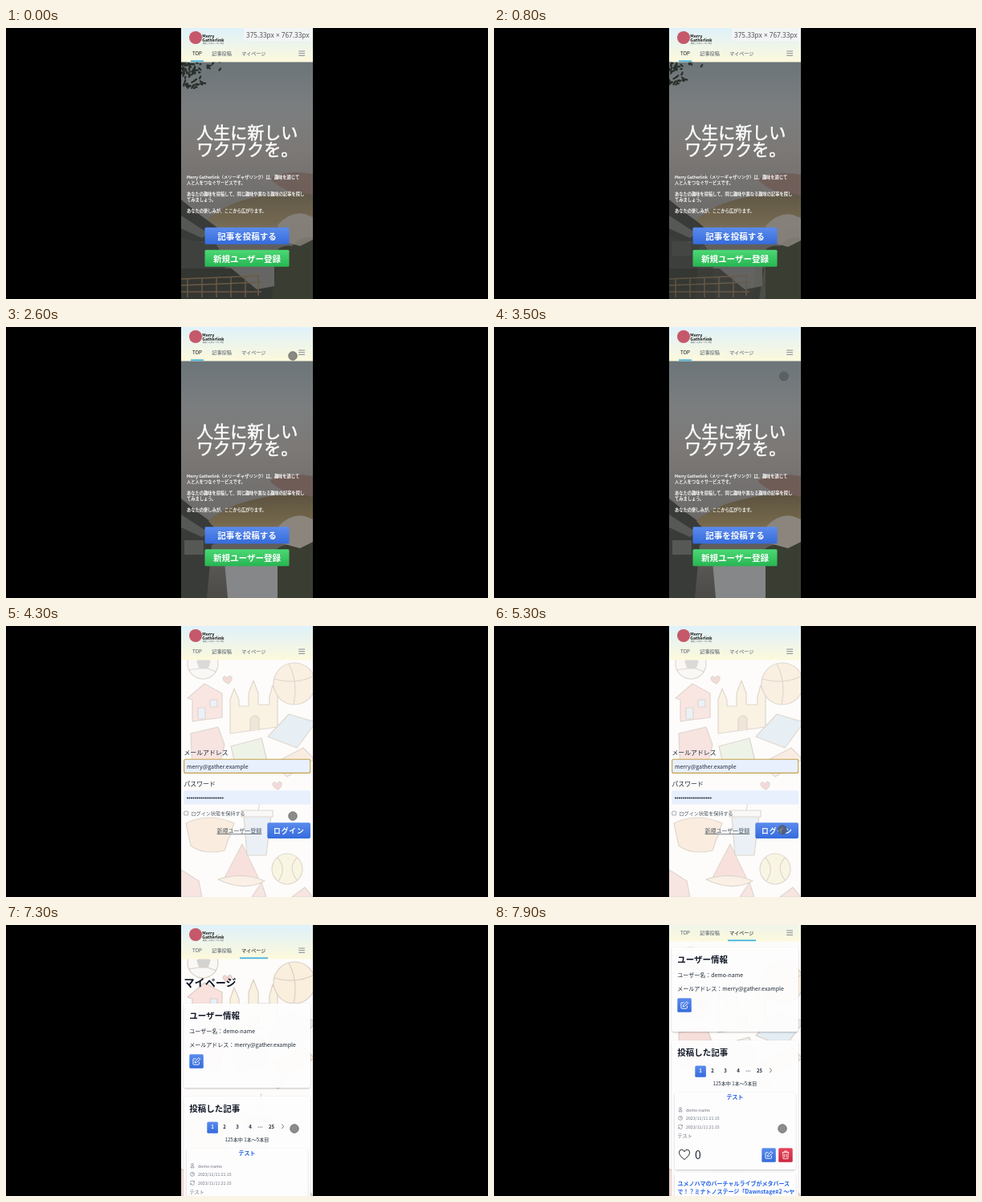
Write an HTML page that moves like this. It is 600 px wide and 338 px high and loops after 8 s.

```html
<!DOCTYPE html>
<html lang="ja">
<head>
<meta charset="utf-8">
<title>Merry Gatherlink</title>
<style>
  html, body { margin: 0; width: 100%; height: 100%; overflow: hidden; background: #000; }
  svg { display: block; width: 100vw; height: 100vh; }
  text { font-family: "Noto Sans CJK JP", "Noto Sans CJK", "Noto Sans", sans-serif; font-size: 7px; fill: #1f2937; }
  .b { font-weight: 700; }
  .mid { text-anchor: middle; }
  .small { font-size: 6.12px; }
  .h2 { font-size: 10.5px; font-weight: 700; fill: #111827; }
  .label { font-size: 7.86px; }
  .nav text { font-size: 6.12px; fill: #4b5563; }
  .nav .on { fill: #111; }
  .hero text { fill: #fff; }
  .hero .lead { font-size: 5.24px; stroke: #fff; stroke-width: .16; }
  .hero .big { font-size: 21px; stroke: #fff; stroke-width: .5; }
  .hero .btn { font-size: 10.5px; font-weight: 700; }
  .meta text { font-size: 5.24px; fill: #6b7280; }
  .link { fill: #2563eb; font-weight: 700; }
  .icon { fill: none; stroke: #6b7280; stroke-width: .6; }
  .card { fill: #fff; fill-opacity: .93; filter: url(#shadow); }
</style>
</head>
<body>
<svg viewBox="0 0 600 338" preserveAspectRatio="none">
  <defs>
    <linearGradient id="head" x2="0" y2="1"><stop stop-color="#dff1fa"/><stop offset="1" stop-color="#fdf9dc"/></linearGradient>
    <linearGradient id="blue" x2="0" y2="1"><stop stop-color="#5b8bec"/><stop offset="1" stop-color="#356bdc"/></linearGradient>
    <linearGradient id="green" x2="0" y2="1"><stop stop-color="#4cd874"/><stop offset="1" stop-color="#27b552"/></linearGradient>
    <linearGradient id="red" x2="0" y2="1"><stop stop-color="#e5455a"/><stop offset="1" stop-color="#cb2740"/></linearGradient>
    <linearGradient id="sky" x2="0" y2="1"><stop stop-color="#6c7579"/><stop offset=".2" stop-color="#7b7e7f"/><stop offset=".36" stop-color="#7c7977"/><stop offset=".65" stop-color="#6d6b69"/><stop offset="1" stop-color="#4c4a47"/></linearGradient>
    <linearGradient id="scales" x2="0" y2="1"><stop stop-color="#5c5340"/><stop offset=".55" stop-color="#73664a"/><stop offset="1" stop-color="#857b6c"/></linearGradient>
    <filter id="shadow" x="-10%" y="-10%" width="120%" height="125%"><feDropShadow dx="0" dy="1" stdDeviation="1" flood-opacity=".25"/></filter>
    <filter id="soft"><feGaussianBlur stdDeviation=".6"/></filter>
    <filter id="haze" x="-10%" y="-10%" width="120%" height="120%"><feGaussianBlur id="blur" stdDeviation="1"/></filter>
    <clipPath id="screen"><rect x="218" width="164" height="338"/></clipPath>
    <g id="pen" fill="none" stroke="#fff" stroke-width=".9" stroke-linejoin="round">
      <path d="M-.5 -3.4H-3.2Q-4 -3.4 -4 -2.6V3.2Q-4 4 -3.2 4H2.6Q3.4 4 3.4 3.2V.5M-1.7 1.7L-1.2 -.5 3 -4.7 4.7 -3 .5 1.2Z"/>
    </g>
    <g id="person" class="icon"><circle cy="-1.4" r="1.3"/><path d="M-2 2.6Q-2 .4 0 .4T2 2.6Z"/></g>
    <g id="clock" class="icon"><circle r="2.5"/><path d="M0 -1.5V0H1.5"/></g>
    <g id="cycle" class="icon"><path d="M-2.6 -.3A2.5 2.5 0 0 1 2.2 -1.2M2.6 .3A2.5 2.5 0 0 1 -2.2 1.2M2.4 -2.6V-1H.8M-2.4 2.6V1H-.8"/></g>
  </defs>

  <rect width="600" height="338"/>
  <g clip-path="url(#screen)">
    <g id="home" class="hero">
      <rect x="218" y="42" width="164" height="296" fill="url(#sky)"/>
      <g filter="url(#soft)">
        <g id="leaves" fill="#2a2f2a"></g>
        <!-- trees and building -->
        <path d="M326 290Q340 268 356 272 368 258 382 262V338H322Z" fill="#3a3d31"/>
        <path d="M218 214L240 232 262 248 276 262 256 272 250 338H218Z" fill="#393b39"/>
        <path d="M218 234L252 256 244 262 218 250ZM222 266H246V284H222Z" fill="#555855"/>
        <!-- fish and hand -->
        <g id="fish">
          <path d="M328 192Q348 180 382 186V214Q350 212 328 192Z" fill="#6f5c56"/>
          <path d="M252 242Q274 222 314 214 350 204 382 212V266Q344 272 308 268 268 264 252 242Z" fill="url(#scales)"/>
          <path d="M338 250Q354 232 372 236L382 240V268L366 276 344 270Z" fill="#8b857e"/>
        </g>
        <path id="cloth" d="M272 292L338 298V338H276Z" fill="#858788"/>
        <g id="deck">
          <path d="M218 262L262 270 276 296 268 304H218Z" fill="#3f413f"/>
          <path d="M218 300H336L330 338H218Z" fill="#343631"/>
          <path d="M276 296L334 290V322L312 326Z" fill="#656663"/>
          <path d="M218 313L316 309M218 321L318 317M218 329H318M226 312V336M244 312V336M262 311V336M280 310V336M298 310V336M314 309V334" fill="none" stroke="#6a5a45" stroke-width="1.5"/>
        </g>
      </g>
      <text class="big" x="237.3" y="138">人生に新しい</text>
      <text class="big" x="237.3" y="159">ワクワクを。</text>
      <g id="copy">
        <text class="lead" x="225" y="188">Merry Gatherlink（メリーギャザリンク）は、趣味を通じて</text>
        <text class="lead" x="225" y="195">人と人をつなぐサービスです。</text>
        <text class="lead" x="225" y="209">あなたの趣味を投稿して、同じ趣味や異なる趣味の記事を探し</text>
        <text class="lead" x="225" y="216">てみましょう。</text>
        <text class="lead" x="225" y="230">あなたの楽しみが、ここから広がります。</text>
        <rect x="247.5" y="249.3" width="105" height="21" rx="1.5" fill="url(#blue)"/>
        <text class="btn mid" x="300" y="264">記事を投稿する</text>
        <rect x="247.5" y="277.3" width="105" height="21" rx="1.5" fill="url(#green)"/>
        <text class="btn mid" x="300" y="292">新規ユーザー登録</text>
      </g>
    </g>

    <g id="paper">
      <rect x="218" width="164" height="338" fill="#fdfcfb"/>
      <g id="doodles" stroke="#8a6a4a" stroke-width="1.2" stroke-linejoin="round">
        <circle cx="245" cy="47" r="19" fill="#f0efee"/>
        <path d="M238 44L246 38 254 44 251 53H241ZM227 55L241 53M251 53L262 57" fill="#777"/>
        <circle cx="359" cy="72" r="26" fill="#f5cf9a"/>
        <path d="M334 66Q360 74 384 62M352 47Q364 70 358 98" fill="none"/>
        <path d="M226 90L247 72 269 84V114L232 119V92Z" fill="#f0a69c"/>
        <path d="M239 102H248V116H239ZM254 92H263V101H254Z" fill="#b8d3ec"/>
        <path d="M279 134V92L284 78 290 92V100H302V84L308 68 314 84V98H328V88L332 74 338 88V126Z" fill="#f3dca4"/>
        <path d="M304 131V116Q309 108 315 115V130" fill="#c9a678"/>
        <path d="M230 134L264 126 272 148 264 180H232Z" fill="#e99a92"/>
        <path d="M326 138L352 110 386 120 362 152Z" fill="#a9cbe3"/>
        <path d="M332 172L370 152 384 166 350 188Z" fill="#efc2a0"/>
        <path d="M280 150L318 140 326 172 288 184Z" fill="#c5d9b4"/>
        <path d="M224 246Q252 232 284 246L272 280Q246 286 230 274Z" fill="#f2c48e"/>
        <path d="M296 238L330 236 324 286H300Z" fill="#b5d0e6"/>
        <path d="M293 230H332V238H293ZM314 230L318 210" fill="#f0efee"/>
        <path d="M272 314L294 272 314 314Q294 324 272 314Z" fill="#ea9388"/>
        <path d="M264 316Q294 306 322 318 296 332 264 316Z" fill="#f3cda5"/>
        <circle cx="350" cy="303" r="19" fill="#f1e2a0"/>
        <path d="M338 289Q350 302 339 318M362 289Q350 302 363 318" fill="none"/>
        <path d="M218 304L240 318 244 338H218ZM306 338L318 320 324 338ZM356 338L372 326 382 338Z" fill="#e8a39a"/>
        <path d="M276 66q-4 -6 -6 -1 0 4 7 7 5 -5 4 -8 -4 -4 -5 2ZM338 198q-4 -6 -6 -1 0 4 7 7 5 -5 4 -8 -4 -4 -5 2Z" fill="#e07a7a"/>
      </g>
    </g>

    <g id="login">
      <text class="label" x="221.5" y="161">メールアドレス</text>
      <rect x="221.7" y="166.2" width="157" height="17.2" rx="2" fill="#e8f0fe" stroke="#c4a24a" stroke-width="1.1"/>
      <text x="225" y="177.5">merry@gather.example</text>
      <text class="label" x="221.5" y="200">パスワード</text>
      <rect x="221.2" y="205.2" width="158" height="17.4" rx="2" fill="#e8f0fe"/>
      <path d="M226 214.5H270" stroke="#1f2937" stroke-width="1.9" stroke-linecap="round" stroke-dasharray="0 2.43"/>
      <rect x="221.8" y="231.2" width="4.8" height="4.8" rx="1" fill="#fff" stroke="#6b7280" stroke-width=".6"/>
      <text class="small" x="230.5" y="236" style="fill:#4b5563">ログイン状態を保持する</text>
      <text x="262.5" y="258" style="fill:#4b5563" text-decoration="underline">新規ユーザー登録</text>
      <rect x="325.3" y="245.3" width="53.7" height="19.8" rx="2" fill="url(#blue)"/>
      <text class="b" x="333" y="258.6" style="font-size:8.74px;letter-spacing:.9px;fill:#fff">ログイン</text>
    </g>

    <g id="mypage">
      <text class="b" x="221.5" y="77" style="font-size:13.1px;fill:#111827">マイページ</text>
      <rect class="card" x="221.3" y="98" width="157.5" height="105" rx="3"/>
      <text class="h2" x="228.3" y="116.5">ユーザー情報</text>
      <text x="228.3" y="134.5">ユーザー名：demo-name</text>
      <text x="228.3" y="152">メールアドレス：merry@gather.example</text>
      <rect x="228.3" y="161.3" width="17.5" height="17.5" rx="1.5" fill="url(#blue)"/>
      <use href="#pen" x="237" y="170.2"/>
      <rect class="card" x="221.3" y="214" width="157.5" height="300" rx="3"/>
      <text class="h2" x="228.3" y="232.5">投稿した記事</text>
      <rect x="250.3" y="245.5" width="13.6" height="14.3" rx="1.5" fill="url(#blue)"/>
      <g class="b mid">
        <text class="small" x="257" y="254" style="fill:#fff">1</text>
        <text class="small" x="272" y="254">2</text>
        <text class="small" x="288" y="254">3</text>
        <text class="small" x="304" y="254">4</text>
        <text class="small" x="330.5" y="254">25</text>
      </g>
      <path d="M314.3 252H319" stroke="#1f2937" stroke-width="1.1" stroke-linecap="round" stroke-dasharray="0 2.1"/>
      <path d="M343 248.6L345.8 251.3 343 254" fill="none" stroke="#374151" stroke-width=".7"/>
      <text class="small mid" x="300" y="270">125本中 1本～5本目</text>
      <g id="posts">
        <rect class="card" x="225" y="279" width="150.5" height="96" rx="3"/>
        <text class="link mid" x="300" y="287.3">テスト</text>
        <use href="#person" x="232" y="300.2"/>
        <use href="#clock" x="232" y="310.8"/>
        <use href="#cycle" x="232" y="321.6"/>
        <g class="meta">
          <text x="239" y="302.5">demo-name</text>
          <text x="239" y="313">2023/11/11 21:15</text>
          <text x="239" y="323.7">2023/11/11 21:15</text>
          <text x="228.5" y="335.3" style="font-size:6.12px">テスト</text>
        </g>
        <path d="M237 362.5Q230.4 357.5 230.4 353.6 230.6 350.2 233.7 350.2 236 350.4 237 352.8 238 350.4 240.3 350.2 243.4 350.2 243.6 353.6 243.6 357.5 237 362.5Z" fill="none" stroke="#111" stroke-width=".9"/>
        <text x="250" y="361.5" style="font-size:14px">0</text>
        <rect x="333.3" y="348.2" width="17.5" height="17.5" rx="1.5" fill="url(#blue)"/>
        <use href="#pen" x="342" y="357.2"/>
        <rect x="354.2" y="348.2" width="17.5" height="17.5" rx="1.5" fill="url(#red)"/>
        <path d="M358.6 353.6H367.4M361.3 353.4V352H364.7V353.4M359.6 353.8L360.1 361.6H365.9L366.4 353.8M361.8 355.5V360M364.2 355.5V360" fill="none" stroke="#fff" stroke-width=".8"/>
        <rect class="card" x="225" y="379" width="150.5" height="96" rx="3"/>
        <text class="link" x="228.5" y="394.7">ユメノハマのバーチャルライブがメタバース</text>
        <text class="link" x="228.5" y="405.3">で！？ミナトノステージ「Dawnstage#2 ～ヤ</text>
      </g>
    </g>

    <g id="header" class="nav">
      <rect x="218" width="164" height="42.5" fill="url(#head)"/>
      <circle cx="236" cy="12" r="8" fill="#c5586a"/>
      <text class="b" x="244.3" y="11.6" style="font-size:5.2px;fill:#111">Merry</text>
      <text class="b" x="244.3" y="16.8" style="font-size:5.2px;fill:#111">Gatherlink</text>
      <text x="245" y="20" style="font-size:2px">趣味と人をゆるくつなぐ場所</text>
      <text id="navTop" x="232" y="34.3">TOP</text>
      <text x="256.3" y="34.3">記事投稿</text>
      <text id="navMine" x="293" y="34.3">マイページ</text>
      <path d="M364.2 29H372M364.2 31.7H372M364.2 34.4H372" stroke="#6b7280" stroke-width=".8"/>
      <rect id="bar" y="40.4" height="1.8" fill="#45b3e0"/>
    </g>

    <g id="sizeTip">
      <rect x="296" width="86" height="16" fill="#f4f6f7" fill-opacity=".9"/>
      <text x="299" y="12" style="font:8.2px 'Noto Sans',sans-serif;fill:#555">375.33px × 767.33px</text>
    </g>
    <circle id="touch" r="5.4" fill="#555" fill-opacity=".68" stroke="#444" stroke-opacity=".7" stroke-width=".7"/>
  </g>
</svg>
<script>
  const LOOP = 8000, LOGIN = 3800, MINE = 5600, TIP_END = 1100;
  const $ = id => document.getElementById(id);
  const set = (id, attrs) => { for (const k in attrs) $(id).setAttribute(k, attrs[k]); };
  const show = (id, on) => set(id, { visibility: on ? 'visible' : 'hidden' });
  const shift = (id, x, y) => set(id, { transform: `translate(${x} ${y})` });
  const ease = p => p * p * (3 - 2 * p);

  // Eased value at time t from a list of [time, value] steps
  function at(t, steps) {
    let [t0, v0] = steps[0];
    for (const [t1, v1] of steps) {
      if (t < t1) return t <= t0 ? v0 : v0 + (v1 - v0) * ease((t - t0) / (t1 - t0));
      t0 = t1; v0 = v1;
    }
    return v0;
  }

  // Leaves hang from the top left corner, thinning outwards
  function growLeaves() {
    let seed = 7, out = '';
    const rnd = () => (seed = seed * 16807 % 2147483647) / 2147483647;
    for (let i = 0; i < 80; i++) {
      const a = rnd() * 1.5, r = rnd();
      const x = 216 + 54 * r * Math.cos(a), y = 42 + 36 * r * Math.sin(a);
      out += `<ellipse rx="${1.5 + 2 * rnd()}" ry="1.2" transform="translate(${x} ${y}) rotate(${rnd() * 180})"/>`;
    }
    $('leaves').innerHTML = out;
  }

  const touchX = [[2200, 372], [2550, 357], [2700, 357], [2950, 367], [3300, 367], [3650, 357], [4600, 357], [4900, 359]];
  const touchY = [[2200, 120], [2550, 36], [2700, 36], [2950, 32], [3300, 32], [3650, 80], [3900, 80], [4250, 237], [4600, 237], [4900, 254]];
  const scroll = [[7350, 0], [7880, 70]];

  function draw(t) {
    const home = t < LOGIN, mine = t >= MINE, y = at(t, scroll);
    show('home', home);
    show('paper', !home);
    show('login', !home && !mine);
    show('mypage', mine);
    show('sizeTip', t < TIP_END);

    const pan = at(t, [[0, 0], [2600, 1]]);
    shift('leaves', -34 * pan, -20 * pan);
    set('deck', { opacity: 1 - pan });
    set('cloth', { opacity: pan });
    set('fish', { opacity: .8 + .2 * pan });
    shift('fish', 0, -4 + 4 * pan);
    shift('copy', 0, t < TIP_END ? -.5 : 0);

    set('doodles', { opacity: mine ? .3 : at(t, [[LOGIN, 0], [LOGIN + 300, .25]]) });
    shift('mypage', 0, -y);
    shift('header', 0, -Math.min(y, 22));
    const blur = at(t, [[MINE, 2], [6350, 0]]);
    set('blur', { stdDeviation: blur });
    if (blur > .02) set('posts', { filter: 'url(#haze)' });
    else $('posts').removeAttribute('filter');
    set('posts', { opacity: at(t, [[MINE, 0], [6350, 1]]) });

    set('navTop', { class: home ? 'on' : '' });
    set('navMine', { class: mine ? 'on' : '' });
    set('bar', { x: mine ? 291 : 230, width: mine ? 35 : 16 });
    show('bar', home || mine);

    show('touch', t >= 2200);
    shift('touch', at(t, touchX), at(t, touchY));
  }

  growLeaves();
  const start = performance.now();
  function tick() {
    draw((performance.now() - start) % LOOP);
    requestAnimationFrame(tick);
  }
  draw(0);
  requestAnimationFrame(tick);
</script>
</body>
</html>
```
